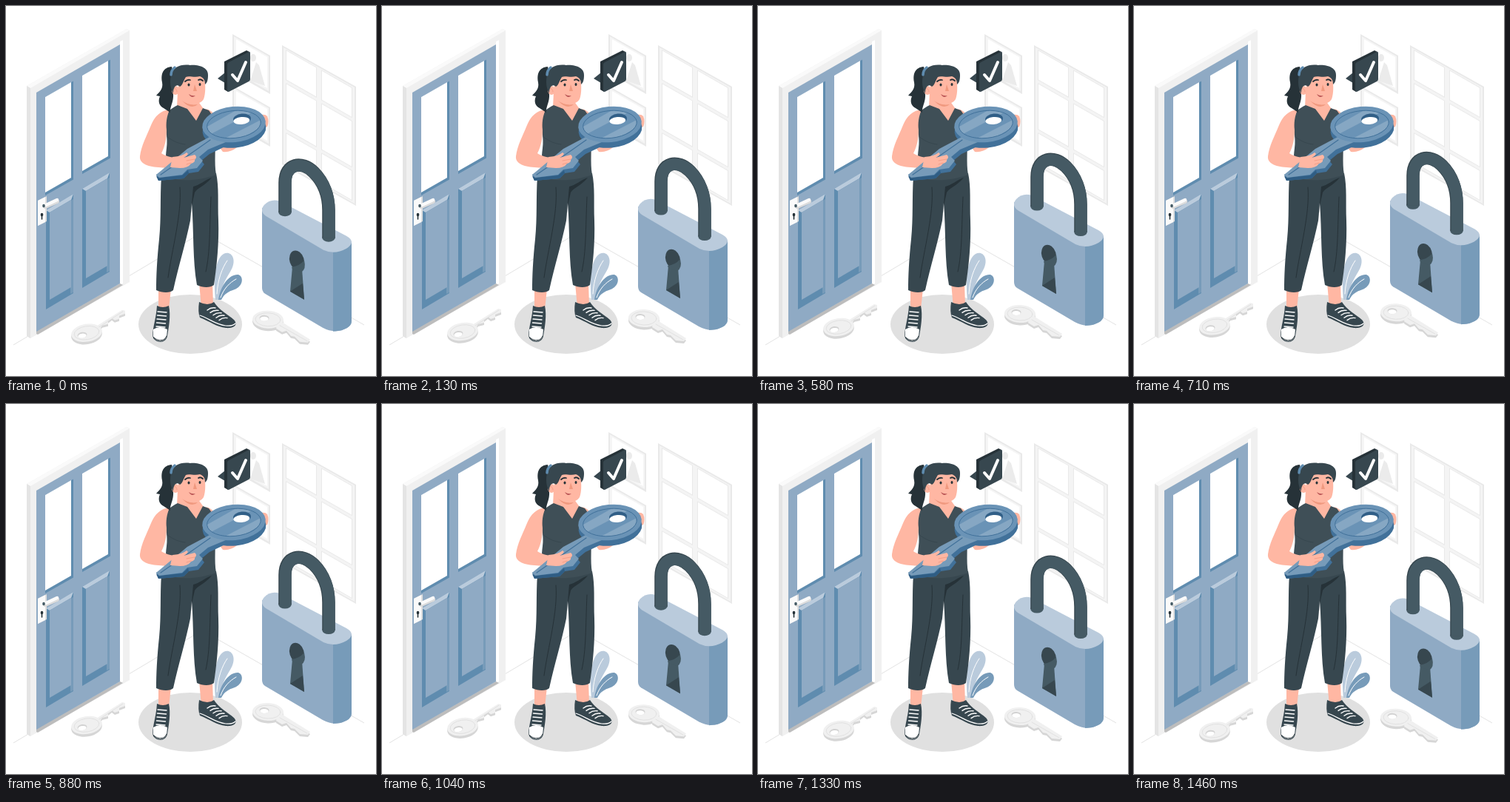
Recreate the animation shown at these times as an HTML page with a canvas. Size 500 px wide and 500 px high, loop 1.5 s.

```html
<!DOCTYPE html>
<html lang="en">
<head>
<meta charset="utf-8">
<title>Key and padlock</title>
<style>
html, body { margin: 0; width: 100%; height: 100%; overflow: hidden; background: #fff; }
canvas { display: block; width: 100vw; height: 100vh; }
</style>
</head>
<body>
<canvas id="stage" width="500" height="500"></canvas>
<script>
const canvas = document.getElementById('stage');
const ratio = window.devicePixelRatio || 1;
canvas.width = canvas.height = 500 * ratio;
const ctx = canvas.getContext('2d');

const LOOP = 1500, LEAD = 20, RISE = 10;
const BLUE = '#8faac4', MID = '#779bb9', DEEP = '#5f8caf', NAVY = '#41719a', PALE = '#bacbdc';
const INK = '#263238', SLATE = '#37474f', STEEL = '#455a64';
const SKIN = '#ffb7a3', SKIN_SHADE = '#f0997f';

function fill(color, path) {
  ctx.fillStyle = color;
  ctx.fill(new Path2D(path));
}

function line(color, width, path, cap = 'round') {
  ctx.strokeStyle = color;
  ctx.lineWidth = width;
  ctx.lineCap = cap;
  ctx.lineJoin = 'round';
  ctx.stroke(new Path2D(path));
}

function oval(color, x, y, rx, ry, tilt = 0, stroke = 0) {
  ctx.beginPath();
  ctx.ellipse(x, y, rx, ry, tilt, 0, Math.PI * 2);
  ctx.fillStyle = ctx.strokeStyle = color;
  ctx.lineWidth = stroke;
  stroke ? ctx.stroke() : ctx.fill();
}

// Parallelogram with vertical sides; rise is the height change from left to right.
function slab(color, x, y, w, h, rise) {
  fill(color, `M${x} ${y}l${w} ${rise}v${h}l${-w} ${-rise}z`);
}

function drawRoom() {
  line('#e3e3e3', 1, 'M10 458L265 306L484 431', 'butt');

  slab('#e9e9e9', 306, 38, 51, 52, 29);
  slab('#f5f5f5', 308, 41, 47, 47, 27);
  slab('#fff', 311, 45, 42, 42, 24);
  fill('#ebebeb', 'M330 101L338 76L342 80L350 108Z');
  oval('#ebebeb', 334, 70, 4, 5);
  slab('#e9e9e9', 306, 108, 51, 53, 29);
  slab('#f5f5f5', 308, 111, 47, 48, 27);
  slab('#fff', 311, 115, 42, 43, 24);

  slab('#e9e9e9', 373, 53, 100, 161, 56);
  slab('#f4f4f4', 375, 56, 96, 157, 54);
  for (const [x, w] of [[378, 42], [426, 42]]) {
    for (const [y, h] of [[59, 41], [104, 63], [171, 41]]) {
      const top = y + (x - 378) * .57;
      slab('#e9e9e9', x, top, w, h, w * .57);
      slab('#fff', x + 1, top + 1.5, w - 2, h - 2, (w - 2) * .57);
    }
  }
}

function drawDoor() {
  fill('#f0f0f0', 'M28 108L163 31L167 33V373L33 449L28 446Z');
  fill('#fafafa', 'M28 108L163 31L167 33L33 111Z');
  fill('#e4e4e4', 'M28 108L33 111V449L28 446Z');
  slab('#fff', 154, 48, 4, 329, -2);
  fill('#bdbdbd', 'M41 439L154 375L158 377L43 444L41 443Z');
  slab(BLUE, 41, 117, 113, 323, -65);

  for (const [x, y] of [[53, 123], [103, 94]]) {
    slab(DEEP, x, y, 38, 133, -21.5);
    slab('#fff', x, y, 35, 129, -20);
  }
  for (const [x, y] of [[54, 276], [103, 247]]) {
    slab(DEEP, x, y, 37, 134, -22);
    fill(PALE, `M${x} ${y}l37 -22l-3 8l-29 17z`);
    slab(MID, x + 33, y - 13, 4, 126, -2);
    slab(BLUE, x + 5, y + 3, 29, 118, -17);
  }

  slab('#dedede', 43, 263, 12, 34, -6);
  slab('#fafafa', 43, 263, 10, 34, -5);
  line('#dcdcdc', 6, 'M53 271L69 264');
  line('#fafafa', 4.5, 'M54 269L69 262');
  oval(STEEL, 51, 270, 1.8, 2.2);
  oval(INK, 48.5, 282, 1.8, 2.2);
  line(INK, 1.6, 'M48.5 283V288');
}

function drawPlant() {
  oval('#e0e0e0', 249, 430, 70, 40);
  fill(PALE, 'M283 397C281 375 281 343 294 335C304 330 311 341 306 353C302 363 292 373 288 397Z');
  line('#fff', 1, 'M285 389C286 370 292 354 299 344');
  fill(MID, 'M287 397C290 377 302 362 314 363C322 366 320 379 309 383C300 386 295 389 291 397Z');
  line('#fff', 1, 'M290 394C294 382 302 374 311 369');
}

function drawShoes() {
  fill(SKIN, 'M206 382H223L220 410H206ZM261 374H279L280 405L264 408Z');
  fill(SLATE, 'M204 405Q212 409 220 405C223 418 220 434 218 446C216 456 204 456 199 449C196 440 203 424 204 405Z');
  fill('#fff', 'M199 437Q208 431 218 437L217 447C213 455 204 454 199 447Z');
  line(INK, 1, 'M199 447C204 453 214 454 217 446');
  for (let i = 0; i < 5; i++) line('#fff', 1.4, `M${205 - i * .5} ${413 + i * 5}l12 1`);

  fill(SLATE, 'M261 400Q273 406 281 400C287 410 300 417 308 424C315 432 306 436 297 435C285 434 275 426 262 421Q259 413 261 400Z');
  line('#fff', 1.2, 'M262 418C274 422 284 431 297 432Q306 433 310 429');
  for (let i = 0; i < 5; i++) line('#fff', 1.4, `M${272 + i * 4} ${411 + i * 3.4}q5 -4 11 -3`);
}

function drawBody() {
  fill(SKIN, 'M270 139Q280 141 283 151L275 154ZM290 193L304 184L312 191Q304 198 293 197Z');
  fill(SLATE, 'M210 230C208 260 210 285 207 315C204 343 203 365 203 384C211 388 222 388 226 384C233 352 243 320 249 290L251 266C254 304 252 344 258 377C266 381 276 381 281 377C285 350 288 320 287 290C286 265 288 245 284 226Z');
  fill(INK, 'M249 290L253 244C262 242 269 235 278 232C268 244 258 246 255 252L251 270Z');
  line(INK, 1, 'M235 245C238 280 224 330 219 367M277 258C275 302 276 332 270 359');

  fill(SKIN, 'M232 116L231 137Q243 151 258 157L267 139L259 128Z');
  fill(SKIN_SHADE, 'M238 128Q247 135 259 133Q250 141 238 128Z');
  fill('#3f4f57', 'M232 134C222 139 217 143 216 153C215 168 219 178 217 192C215 207 216 220 212 231C236 238 262 236 284 228C281 212 284 191 282 176C280 160 282 150 274 141L266 138L257 155L245 139Z');
  line(SLATE, 1, 'M218 177Q230 186 242 187M218 222Q235 220 247 211');
  fill(SKIN, 'M221 140C209 141 201 149 196 161C190 176 183 188 181 203C180 212 190 217 206 218C220 219 234 220 243 218C250 211 246 204 241 204C228 207 216 203 210 199C215 190 217 178 217 168C216 158 217 150 221 140Z');
}

function drawHead() {
  fill(INK, 'M224 82C212 83 209 92 211 103C213 113 206 117 203 121L208 122C205 129 207 135 213 138L222 144C221 136 227 130 226 118C224 107 222 100 226 92Z');
  fill(SKIN, 'M234 96C232 110 231 122 239 128C248 135 262 134 267 126C270 118 270 104 267 92L250 87Z');
  oval(SKIN, 229, 114, 5, 6);
  line(SKIN_SHADE, .8, 'M227 111Q231 112 231 116');
  fill(SLATE, 'M223 94C224 82 238 78 249 80C262 79 274 84 273 94C273 99 272 104 269 106C269 100 267 97 262 95C255 97 247 94 243 96C240 100 239 107 235 109C231 105 226 108 226 118C222 112 221 102 223 94Z');
  line(DEEP, 3.5, 'M223 93Q223 87 228 83');
  oval(INK, 247, 106.5, 1.5, 2.1);
  oval(INK, 262, 106, 1.5, 2.1);
  line(INK, 1.8, 'M242 102Q245 99 249 100M260 100Q263 98 266 101');
  fill(SKIN_SHADE, 'M255 106L258 115L253 115Z');
  fill('#b95555', 'M247 119Q251 122 256 121Q251 126 247 119Z');
}

function drawBigKey() {
  const tilt = -.1;
  fill(SKIN, 'M341 148Q350 145 353 149Q356 156 353 163L343 167Z');
  oval(NAVY, 308.5, 167, 43, 24.5, tilt);
  fill(NAVY, 'M203 228L206 236L240 233L247 226L260 224L268 214L264 209L275 200L294 191L285 179Z');
  fill('#2f5d84', 'M203 230L206 236L240 233L247 226L246 222L238 229L207 232Z');
  fill(MID, 'M277 176L245 193L203 228L207 232L238 228L245 221L258 219L266 209L261 204L273 194L297 184Z');
  oval('#6a93b6', 308, 160, 43, 24, tilt);

  ctx.save();
  ctx.beginPath();
  ctx.ellipse(308, 160, 36.5, 18.5, tilt, 0, Math.PI * 2);
  ctx.clip();
  fill('#86a7c3', 'M270 164L318 137L338 141L275 174ZM286 184L350 151L354 158L302 189Z');
  ctx.restore();
  oval(NAVY, 308, 160, 36.5, 18.5, tilt, 1);
  line(NAVY, 1.2, 'M209 228L276 181');

  oval('#315f87', 319, 152.5, 12, 7, tilt);
  oval('#fff', 318.3, 155, 11, 5, tilt);
  fill(SKIN, 'M225 204Q239 203 244 198Q249 200 240 205L255 201Q259 204 255 208Q256 211 250 213Q246 219 235 219L222 218Z');
  line(SKIN_SHADE, .8, 'M244 209L255 207M244 214L250 212');
}

function drawBubble() {
  fill(SLATE, 'M286 98L296 90V104Z');
  fill(INK, 'M295 75L325 60L329 62L300 79V116L295 113Z');
  fill(SLATE, 'M299 79Q299 77 301 76L328 62Q330 61 330 64V99Q330 101 328 102L301 116Q299 116 299 114Z');
  line('#fff', 4, 'M306 93L313 101L324 76');
}

function drawFloorKeys() {
  const paper = '#f0f0f0', edge = '#d6d6d6';
  const keys = [
    { x: 109, y: 442, tilt: -.16, hole: [103, 446],
      blade: 'M122 433L157 411L161 412V416L153 419V423L147 425L143 422L138 426V430L130 432L126 438Z' },
    { x: 354, y: 424, tilt: .04, hole: [349, 423],
      blade: 'M366 431L374 428L411 451L408 455L397 454L390 447L385 446L379 439L373 441L365 436Z' }
  ];
  for (const { x, y, tilt, hole, blade } of keys) {
    ctx.save();
    ctx.translate(0, 3);
    oval(edge, x, y, 21, 12.5, tilt);
    fill(edge, blade);
    ctx.restore();
    oval(paper, x, y, 21, 12, tilt);
    fill(paper, blade);
    oval('#dedede', x, y, 17, 9, tilt, .8);
    oval('#d2d2d2', hole[0], hole[1] - 1, 6.5, 4, tilt);
    oval('#fff', ...hole, 5.7, 3, tilt);
  }
  line('#dedede', .8, 'M126 434L158 413M370 432L407 453');
}

function drawPadlock() {
  fill(BLUE, 'M346 273V381Q346 386 350 389L428 435Q441 442 454 438.5Q467 433 467 426V319Z');
  fill(MID, 'M442 331V440Q467 438 467 426V319Q464 331 442 331Z');
  fill(PALE, 'M349 269Q358 260 370 264L460 311Q474 319 460 328Q444 337 429 330L351 284Q342 277 349 269Z');
  oval(STEEL, 377, 279, 8.7, 5.5);
  oval(STEEL, 436, 313.5, 8.7, 5.5);
  const shackle = 'M377 279V239C377 212 400 209 416 225C430 239 436 258 436 276V313.5';
  line(SLATE, 17.5, shackle, 'butt');
  ctx.save();
  ctx.translate(.6, .6);
  line(STEEL, 16, shackle, 'butt');
  ctx.restore();

  fill(STEEL, 'M387 353L384 386L403 397L400 355Z');
  fill(SLATE, 'M384 386L401 375L403 397Z');
  oval(SLATE, 393, 344, 9.7, 13.5, -.3);
  fill(STEEL, 'M386 353Q396 352 403 344Q406 356 399 360L387 356Z');
}

function draw(now) {
  const phase = ((now + LEAD) % LOOP) / LOOP;
  const lift = RISE * (1 - Math.abs(1 - 2 * phase));
  ctx.setTransform(ratio, 0, 0, ratio, 0, 0);
  ctx.fillStyle = '#fff';
  ctx.fillRect(0, 0, 500, 500);

  drawRoom();
  drawDoor();
  drawPlant();
  drawShoes();
  drawBody();
  drawHead();
  drawBigKey();
  drawBubble();

  ctx.translate(0, -lift);
  drawFloorKeys();
  drawPadlock();
}

const start = performance.now();
function tick() {
  draw(performance.now() - start);
  requestAnimationFrame(tick);
}
tick();
</script>
</body>
</html>
```
